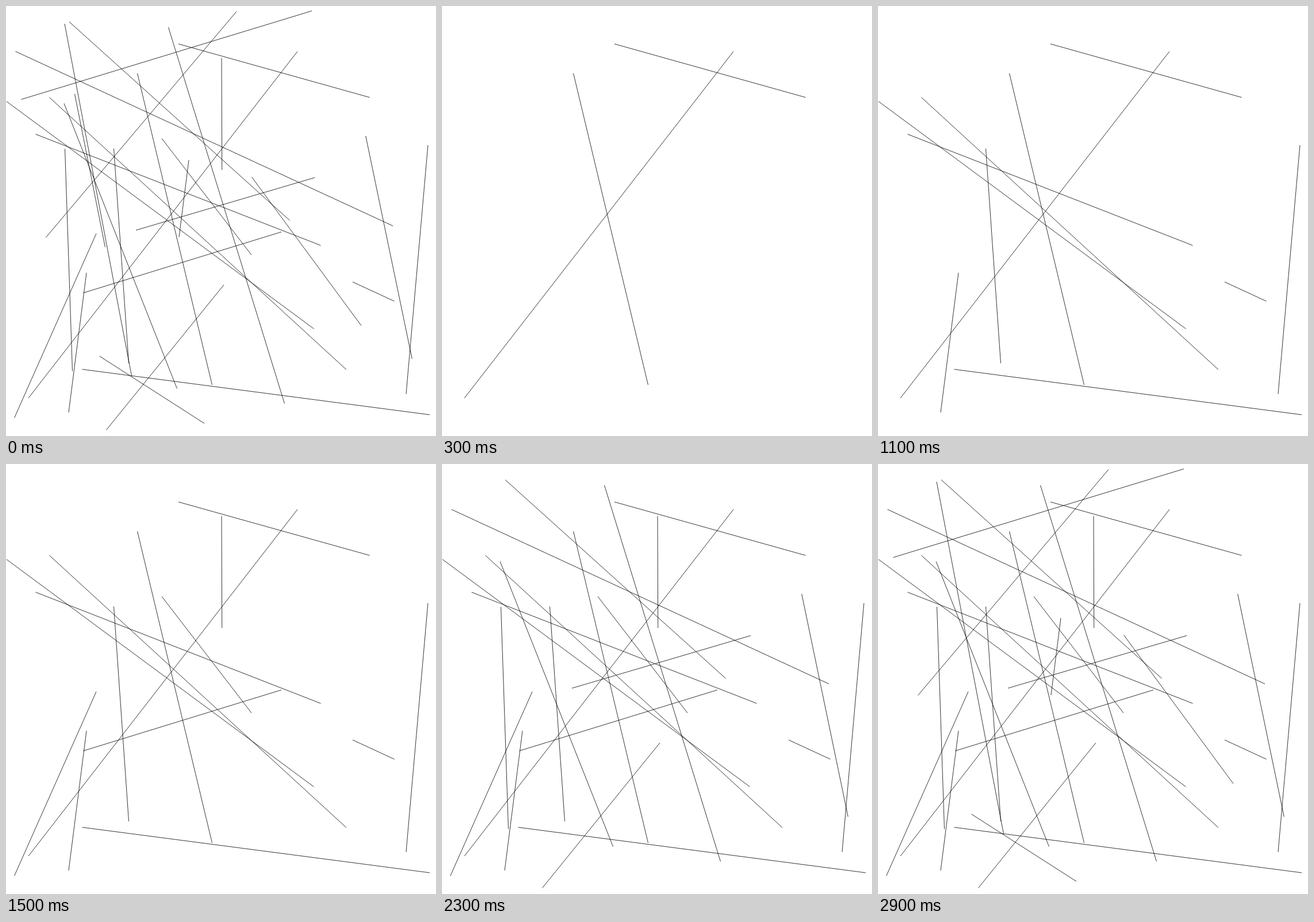
An HTML page that plays this animation: 748x748 px, repeating every 3000 ms.

```html
<!DOCTYPE html>
<html lang="en">
<head>
<meta charset="utf-8">
<title>Gathering lines</title>
<style>
html, body { margin: 0; width: 100%; height: 100%; overflow: hidden; background: #fff; }
svg { display: block; width: 100vw; height: 100vh; }
</style>
</head>
<body>
<svg id="stage" viewBox="0 0 748 748" stroke="#000" stroke-width="0.8"></svg>
<script>
// End points x1, y1, x2, y2 in order of appearance
const LINES = [
  [300, 66, 632.5, 159], [507, 79, 39, 682], [228.5, 117, 358.5, 659],
  [75.5, 159, 592, 632.5], [140, 464, 109, 707], [187.5, 248, 213.5, 621.5],
  [1, 166, 535.5, 561.5], [132.5, 632, 737, 711], [51.5, 223, 547.5, 416.5],
  [734, 242, 696, 675], [603, 480, 675.5, 513.5], [271, 230.5, 427, 433],
  [134.5, 499, 479, 393], [157, 396, 14.5, 716.5], [375, 90.5, 375.7, 285],
  [110, 27.5, 493.5, 373], [226, 390, 537, 298.5], [101, 169.5, 297.5, 665.5],
  [282.5, 37, 484.5, 691.5], [102.5, 248.5, 115.5, 635], [16.5, 79, 673, 382.5],
  [625.7, 226, 706.3, 613.5], [379, 485, 174.5, 737.5], [162.5, 609, 345, 726],
  [102, 31, 218.5, 643.5], [401, 9.5, 69.5, 402.5], [26.5, 162.5, 532, 8.5],
  [318, 268, 301, 402], [427.5, 297.5, 618, 556], [119.5, 153, 172.5, 419.5]
];
const STEP = 100;
const stage = document.getElementById("stage");

const nodes = LINES.map(points => {
  const node = document.createElementNS("http://www.w3.org/2000/svg", "line");
  ["x1", "y1", "x2", "y2"].forEach((key, i) => node.setAttribute(key, points[i]));
  return stage.appendChild(node);
});

// The loop opens with every line, then clears and adds one per step.
function draw(ms) {
  const count = Math.floor(ms / STEP) % LINES.length || LINES.length;
  nodes.forEach((node, i) => node.setAttribute("visibility", i < count ? "visible" : "hidden"));
}

let start = null;
function tick(now) {
  if (start === null) start = now;
  draw(now - start);
  requestAnimationFrame(tick);
}
draw(0);
requestAnimationFrame(tick);
</script>
</body>
</html>
```
